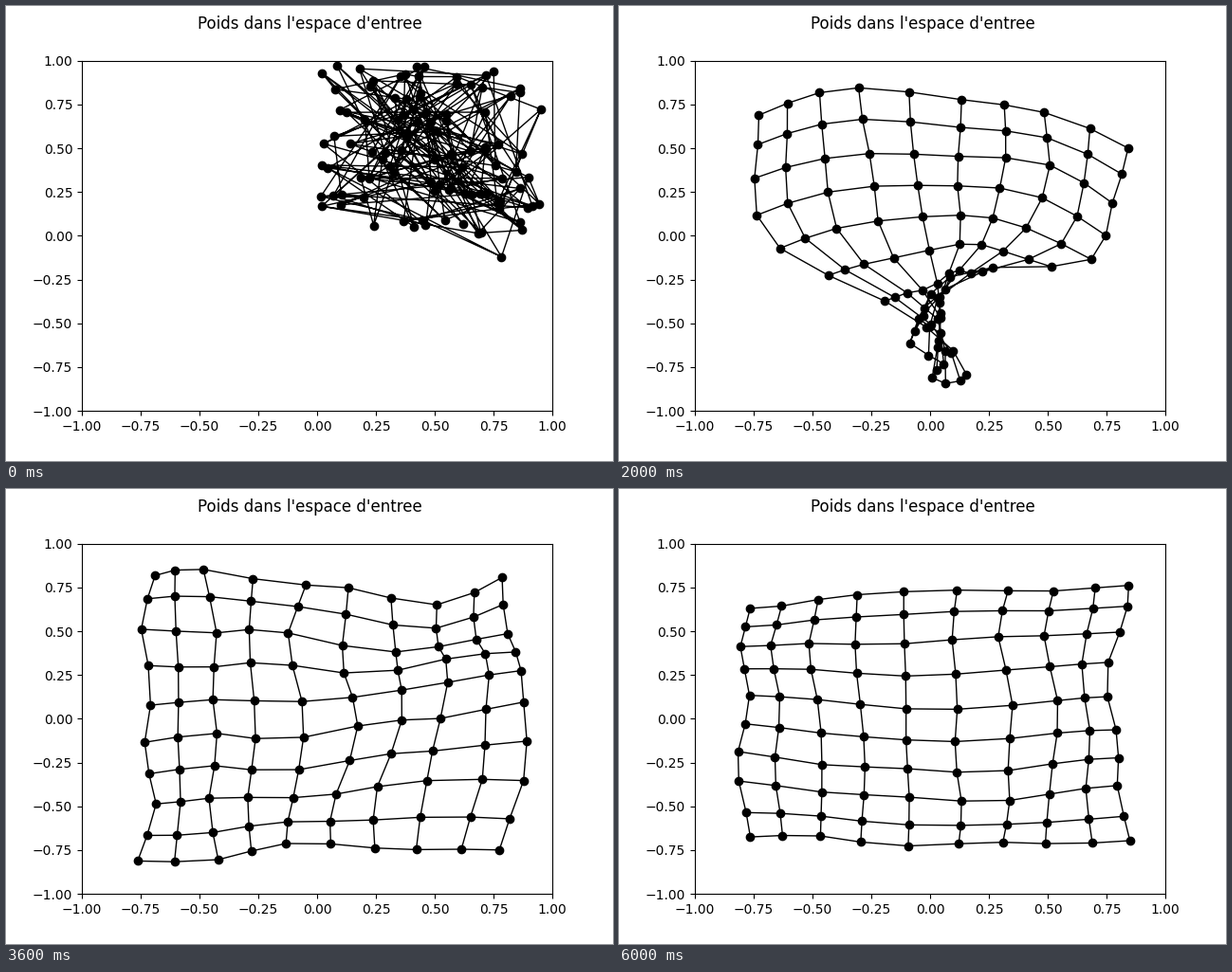
Recreate the animation shown at these times as a matplotlib script. Size 640 by 480 pixels, loop 6200 ms.

```python
import numpy as np
import matplotlib.pyplot as plt
from matplotlib.animation import FuncAnimation

N, FRAMES, STEP = 10, 31, 200

axis = np.linspace(-1, 1, N)
U, V = np.meshgrid(axis, -axis)          # columns left to right, rows top down
ROW = np.arange(N)[:, None]


def spread(a):
    """Nodes lie closer together towards the border."""
    return np.sin(a) / np.sin(1)


def sheet(width, height, x0, y0, *bumps):
    """Flat mesh pushed locally by bumps (u, v, dx, dy)."""
    x, y = x0 + width * spread(U), y0 + height * spread(V)
    for u, v, dx, dy in bumps:
        push = np.exp(-((U - u) ** 2 + (V - v) ** 2) / 0.4)
        x, y = x + dx * push, y + dy * push
    return np.stack([x, y], axis=-1)


def twist(cross, soft, bend, sag, lean, tilt):
    """Mesh whose rows shrink, cross over and come out mirrored."""
    half = 0.05 + 0.745 * np.tanh((cross - ROW) / soft)
    mid = 0.82 - 1.65 * (ROW / (N - 1)) ** bend
    x = 0.06 + half * spread(U)
    y = mid - sag * half * U**2 + (lean - tilt * half) * U
    return np.stack([x, y], axis=-1)


def tangle():
    pts = np.random.default_rng(5).uniform(0.01, 0.98, (N, N, 2))
    pts[4, 5] = 0.775, -0.125
    return pts


# Step at which each pose is reached
POSES = {
    0: tangle(),
    4: twist(6.6, 1.4, 1.15, 0.32, 0.035, 0.12),
    8: twist(5.6, 1.7, 1.0, 0.40, 0.08, 0.28),
    13: sheet(0.79, 0.78, 0, 0, (-1, 0, -0.03, -0.17), (0.1, -0.7, 0, 0.2),
              (0, 1, -0.1, 0.04), (0.5, 0.15, -0.08, 0),
              (-0.4, 0.15, 0.07, 0)),
    18: sheet(0.75, 0.78, 0.04, 0, (0.4, 0.9, 0, -0.17),
              (1, -0.15, 0.08, 0.19), (0.2, -0.9, -0.08, 0.06),
              (-0.3, 0.9, -0.03, 0.08)),
    23: sheet(0.79, 0.79, 0, 0, (0.4, 0.85, -0.07, -0.21),
              (1, 0.25, 0.04, -0.19), (-0.4, 1, -0.03, 0.1),
              (0.5, 0, 0.07, -0.04)),
    30: sheet(0.79, 0.7, 0.01, 0.04, (-0.9, 1, 0, -0.09),
              (0.2, -0.9, 0, -0.06), (0, 0, 0, -0.06)),
}
KEYS = list(POSES)
MODES = np.cos(np.pi * np.outer(np.arange(6), np.arange(N)) / (N - 1))


def wobble(i):
    """Small random pull shared by neighbouring nodes."""
    amp = np.random.default_rng(100 + i).normal(0, 0.005, (6, 6, 2))
    return np.einsum("abk,ai,bj->ijk", amp, MODES, MODES)


def mesh(i):
    k = min(np.searchsorted(KEYS, i, "right"), len(KEYS) - 1)
    start, end = KEYS[k - 1], KEYS[k]
    t = (i - start) / (end - start)
    if start == 0:
        t = 1 - (1 - t) ** 3             # the tangle opens fast
    return (1 - t) * POSES[start] + t * POSES[end] + wobble(i)


def strands(pts):
    """All rows and columns as one path with gaps."""
    both = np.concatenate([pts, pts.swapaxes(0, 1)])
    gaps = np.full((2 * N, 1, 2), np.nan)
    return np.concatenate([both, gaps], axis=1).reshape(-1, 2).T


fig, ax = plt.subplots(figsize=(6.4, 4.8), dpi=100)
fig.suptitle("Poids dans l'espace d'entree")
ax.set(xlim=(-1, 1), ylim=(-1, 1))
lines, = ax.plot([], [], "k-", lw=1)
dots, = ax.plot([], [], "ko")


def update(i):
    pts = mesh(i)
    lines.set_data(*strands(pts))
    dots.set_data(*pts.reshape(-1, 2).T)
    return lines, dots


anim = FuncAnimation(fig, update, frames=FRAMES, interval=STEP,
                     repeat=True, repeat_delay=0)
plt.show()
```
